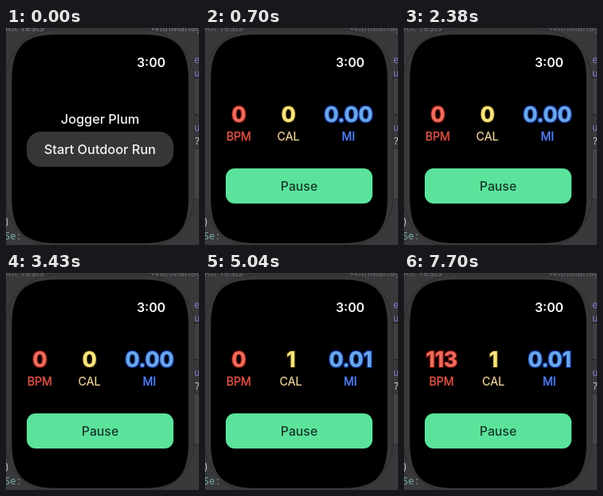
These frames come from a looping animation (242 by 272 pixels, 8000 ms). An HTML page:

```html
<!DOCTYPE html>
<html lang="en">
<head>
<meta charset="utf-8">
<title>Workout watch</title>
<style>
html, body { margin: 0; width: 100%; height: 100%; overflow: hidden; background: #39393c; }
svg { display: block; width: 242px; height: 272px; font-family: Inter, sans-serif; }
.mid { text-anchor: middle; }
.body { font-size: 16.3px; font-weight: 450; fill: #f4f4f4; }
.value { font-size: 26.6px; font-weight: 800; letter-spacing: -0.5px; paint-order: stroke; stroke-width: 3px; stroke-linejoin: round; }
.label { font-size: 14.2px; font-weight: 400; paint-order: stroke; stroke-width: 1.5px; }
.code { font-size: 12px; font-family: "Noto Sans Mono", monospace; }
</style>
</head>
<body>
<svg viewBox="0 0 242 272">
  <rect width="242" height="272" fill="#39393b"/>
  <g class="code">
    <g id="topText" font-family="Inter, sans-serif" fill="#85858a">
      <text x="-1" y="3.5">Kit Tests</text>
      <text x="181" y="3.5">WithManager</text>
    </g>
    <g fill="#8a72c6">
      <text x="236" y="44">e</text>
      <text x="236" y="61">u</text>
      <text x="236" y="129">u</text>
    </g>
    <text x="236" y="146" fill="#c9c9cc">?</text>
  </g>
  <rect x="233" y="62" width="24" height="47" rx="7" fill="#404043" stroke="#19191b" stroke-width="1.2"/>
  <rect x="232" y="151" width="20" height="64" fill="#444447" stroke="#2a2a2c"/>
  <rect x="-1" y="2" width="237" height="273" rx="64" fill="#383839" stroke="#2c2c2e"/>
  <g class="code">
    <text x="-2.5" y="247" fill="#c9c9cc">)</text>
    <text x="-2" y="265" fill="#79aaa5">Se:</text>
  </g>
  <path d="M7.3 66 C7.3 23 23 8.3 64 8.3 H172 C213 8.3 228.8 23 228.8 66 V212 C228.8 255 213 269.8 172 269.8 H64 C23 269.8 7.3 255 7.3 212 Z" fill="#000"/>
  <text x="200" y="49" text-anchor="end" font-size="15.8" font-weight="600" fill="#fafafa">3:00</text>

  <g id="start">
    <text class="mid body" x="118" y="120">Jogger Plum</text>
    <rect id="startBtn" y="130" height="44" rx="18" fill="#363637"/>
    <text class="mid body" x="117.8" y="158">Start Outdoor Run</text>
  </g>

  <g id="run">
    <g id="stats"></g>
    <rect x="26" y="176" width="184" height="44" rx="11" fill="#5be39b"/>
    <text class="mid" x="118" y="204" font-size="15.8" font-weight="500" fill="#17382a">Pause</text>
  </g>
</svg>
<script>
const LOOP = 8000, PRESS = 560, OPEN = 700, MOVED = 4550, PULSE = 5950;
const $ = id => document.getElementById(id);
const NS = "http://www.w3.org/2000/svg";

function addText(cls, y, fill, edge) {
  const t = document.createElementNS(NS, "text");
  t.setAttribute("class", "mid " + cls);
  t.setAttribute("y", y);
  t.setAttribute("fill", fill);
  t.setAttribute("stroke", edge);
  return $("stats").appendChild(t);
}

function stat(name, color, labelColor, edge) {
  const value = addText("value", 117.8, color, edge);
  const label = addText("label", 140.8, labelColor, edge);
  label.textContent = name;
  return (x, text) => {
    value.setAttribute("x", x);
    label.setAttribute("x", x);
    value.textContent = text;
  };
}

const bpm = stat("BPM", "#ee6a5a", "#d65f54", "#520a06");
const cal = stat("CAL", "#fae57c", "#ecd9ae", "#2a1e06");
const mi = stat("MI", "#68a6ea", "#648be0", "#09206e");

function draw(t) {
  const running = t >= OPEN, moved = t >= MOVED, pulse = t >= PULSE;
  $("start").style.display = running ? "none" : "";
  $("run").style.display = running ? "" : "none";
  $("topText").style.opacity = running ? 0.6 : 0.85;

  const inset = t >= PRESS ? 1 : 0;
  $("startBtn").setAttribute("x", 26 + inset);
  $("startBtn").setAttribute("width", 184 - 2 * inset);

  bpm(pulse ? 47 : 42.3, pulse ? "113" : "0");
  cal(pulse ? 112 : moved ? 107.5 : 104.5, moved ? "1" : "0");
  mi(moved ? 182.3 : 179.7, moved ? "0.01" : "0.00");
}

const origin = performance.now();
function tick() {
  draw((performance.now() - origin) % LOOP);
  requestAnimationFrame(tick);
}
draw(0);
requestAnimationFrame(tick);
</script>
</body>
</html>
```
